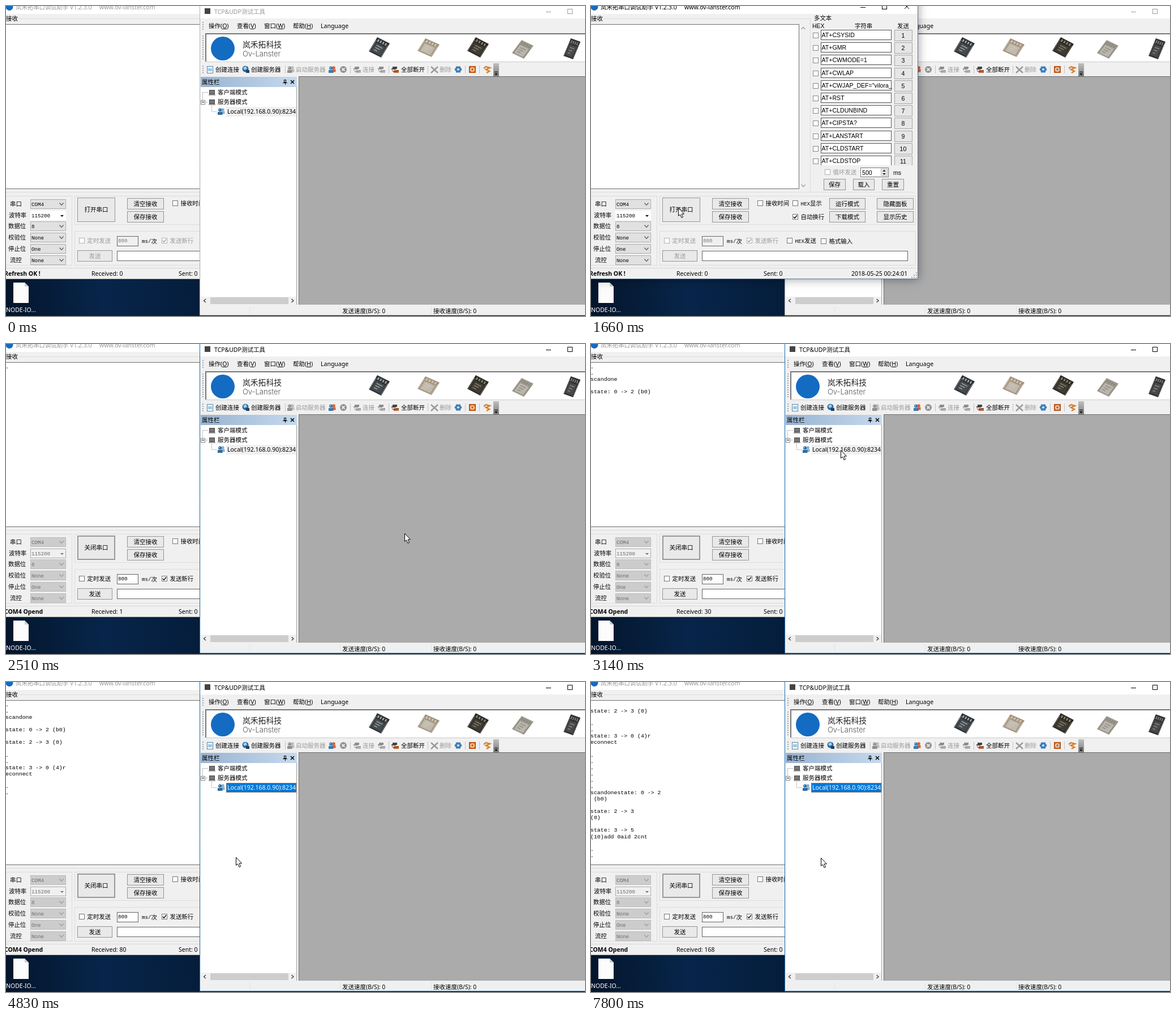
Animation, 1023 px wide and 547 px high, one loop 8000 ms. Source, as an HTML page with a canvas:

```html
<!DOCTYPE html>
<html lang="zh">
<head>
<meta charset="utf-8">
<style>
html, body { margin: 0; width: 100%; height: 100%; overflow: hidden; }
canvas { display: block; }
</style>
</head>
<body>
<canvas id="stage" width="1023" height="547"></canvas>
<script>
const g = document.getElementById('stage').getContext('2d');
const LOOP = 8000;
const CJK = '"Noto Sans CJK SC", "Noto Sans CJK JP", sans-serif';
const UI = '"Noto Sans", ' + CJK;
const ARIAL = '"Liberation Sans", ' + CJK;
const MONO = '"Liberation Mono", "Noto Sans CJK SC", monospace';
const GREY = '#9a9a9a';

// Serial log: [time, bytes received, ...new lines]
const log = [
  [2370, 1, '.'], [2970, 2, '.'],
  [3060, 30, 'scandone', '', 'state: 0 -> 2 (b0)', ''],
  [3220, 49, 'state: 2 -> 3 (0)', ''],
  [3440, 50, '.'], [3850, 51, '.'],
  [4220, 78, 'state: 3 -> 0 (4)r', 'econnect', ''],
  [4290, 79, '.'], [4760, 80, '.'], [5300, 81, '.'],
  [5770, 82, '.'], [6330, 83, '.'], [6790, 84, '.'],
  [7020, 112, 'scandonestate: 0 -> 2', ' (b0)', ''],
  [7090, 130, 'state: 2 -> 3', '(0)', ''],
  [7170, 166, 'state: 3 -> 5', '(10)add 0aid 2cnt', ''],
  [7250, 167, '.'], [7800, 168, '.']
];

// Pointer path: [time, x, y]
const path = [
  [70, 889, 537], [230, 790, 400], [390, 560, 260], [480, 430, 251],
  [620, 260, 300], [810, 164, 354], [880, 164, 354], [1050, 144, 355],
  [1430, 144, 355], [1470, 154, 357], [1890, 154, 357], [2370, 704, 335],
  [2680, 704, 335], [3080, 441, 188], [3380, 441, 188], [3430, 442, 184],
  [3640, 442, 184], [3670, 442, 183], [4220, 442, 183], [4290, 445, 190],
  [4800, 406, 310], [6390, 406, 310], [6400, 406, 311]
];

function text(s, x, y, color = '#000', size = 10.5, font = UI, weight = '') {
  g.font = `${weight} ${size}px ${font}`;
  g.fillStyle = color;
  g.fillText(s, x, y + size * 0.36);
}

function centred(s, x, y, color, size, font) {
  g.textAlign = 'center';
  text(s, x, y, color, size, font);
  g.textAlign = 'left';
}

function rect(x, y, w, h, fill, border) {
  if (fill) { g.fillStyle = fill; g.fillRect(x, y, w, h); }
  if (border) {
    g.strokeStyle = border;
    g.lineWidth = 1;
    g.strokeRect(x + 0.5, y + 0.5, w - 1, h - 1);
  }
}

function line(color, width, ...p) {
  g.strokeStyle = color;
  g.lineWidth = width;
  g.beginPath();
  for (let i = 0; i < p.length; i += 2) g.lineTo(p[i], p[i + 1]);
  g.stroke();
}

function poly(fill, ...p) {
  g.fillStyle = fill;
  g.beginPath();
  for (let i = 0; i < p.length; i += 2) g.lineTo(p[i], p[i + 1]);
  g.fill();
}

function dot(x, y, r, fill) {
  g.fillStyle = fill;
  g.beginPath();
  g.arc(x, y, r, 0, 7);
  g.fill();
}

function gradient(x0, y0, x1, y1, ...colors) {
  const f = g.createLinearGradient(x0, y0, x1, y1);
  colors.forEach((c, i) => f.addColorStop(i / (colors.length - 1), c));
  return f;
}

function button(s, x, y, w, h = 20, color = '#000') {
  rect(x, y, w, h, '#e9e9e9', '#959595');
  centred(s, x + w / 2, y + h / 2, color);
}

function check(s, x, y, on, color = '#000', tx = x + 14.5) {
  rect(x, y, 10, 10, '#fff', color === '#000' ? '#777' : '#b0b0b0');
  if (on) line(color, 1.4, x + 2, y + 5, x + 4, y + 7.4, x + 8, y + 2.5);
  const latin = s.startsWith('HEX') ? 'HEX' : '';
  if (latin) text(latin, tx, y + 5.5, color, 9.2, MONO);
  text(s.slice(latin.length), tx + latin.length * 5.5, y + 5.5, color, 10.4, CJK);
}

const chevron = (x, y, c) => line(c, 1.2, x - 3.5, y - 2, x, y + 1.8, x + 3.5, y - 2);

function desktop() {
  rect(0, 0, 1023, 547, gradient(0, 520, 343, 500, '#04152b', '#07254a', '#051d3b'));
  poly('#fcfcfc', 13, 488, 33, 488, 40, 495, 40, 524, 13, 524);
  poly('#c9d0d6', 33, 488, 40, 495, 33, 495);
  text('NODE-IO...', 0, 536, '#fff');
}

function titleButtons(x, y, c, close) {
  line(c, 1, x, y + 1.5, x + 9, y + 1.5);
  rect(x + 38, y - 4, 9, 9, null, c);
  if (close) {
    line(c, 1, x + 78, y - 4, x + 86, y + 4);
    line(c, 1, x + 86, y - 4, x + 78, y + 4);
  }
}

function combos(open) {
  const rows = [['串口', 'COM4', 7], ['波特率', '115200', 5], ['数据位', '8', 4],
    ['校验位', 'None', 4], ['停止位', 'One', 4], ['流控', 'None', 7]];
  rows.forEach(([label, value, x], i) => {
    const y = Math.round(341 + i * 19.7), edit = i === 1;
    text(label, x, y + 8, '#000', 10.4, CJK);
    if (edit) rect(43, y, 63, 17, open ? '#f0f0f0' : '#fff', open ? '#adadad' : '#fff');
    else rect(43, y, 63, 17, open ? '#cccccc' : '#e1e1e1', open ? '#bcbcbc' : '#adadad');
    const c = open ? '#6d6d6d' : '#000';
    text(value, 45, y + 8.5, c, 9.2, MONO);
    if (edit) poly(c, 96, y + 8, 102, y + 8, 99, y + 11);
    else chevron(98, y + 8.5, open ? '#999' : '#555');
  });
}

function multiText() {
  line('#dcdcdc', 1, 387.5, 22, 387.5, 328);
  text('多文本', 394, 21.5, '#000', 10.4, CJK);
  text('HEX', 391, 35, '#000', 10.5, ARIAL);
  text('字符串', 466, 35, '#000', 10.4, CJK);
  text('发送', 541, 35, '#000', 10.4, CJK);
  const cmds = ['CSYSID', 'GMR', 'CWMODE=1', 'CWLAP', 'CWJAP_DEF="vilora_', 'RST',
    'CLDUNBIND', 'CIPSTA?', 'LANSTART', 'CLDSTART', 'CLDSTOP'];
  g.save();
  g.beginPath();
  g.rect(388, 40, 186, 241);
  g.clip();
  cmds.forEach((cmd, i) => {
    const y = Math.round(42 + i * 22.2);
    rect(392, y + 5, 10, 10, '#fff', '#8a8a8a');
    rect(406, y, 125, 18, '#fff', '#555');
    text('AT+' + cmd, 407.5, y + 9, '#000', 10.6, ARIAL);
    rect(536, y, 32, 20, '#e6e6e6', '#a5a5a5');
    centred(i + 1, 551.5, y + 10.5, '#000', 10.6, ARIAL);
  });
  g.restore();
  check('循环发送', 413, 288, false, GREY);
  rect(476, 285, 50, 17, '#fff', '#777');
  text('500', 479, 294, '#000', 10.6, ARIAL);
  rect(512, 287, 12, 13, '#e8e8e8', '#bbb');
  poly('#222', 515, 292, 521, 292, 518, 289);
  poly('#222', 515, 295, 521, 295, 518, 298);
  text('ms', 534, 294, '#000', 10.6, ARIAL);
  button('保存', 411, 305, 39);
  button('载入', 463, 305, 38);
  button('重置', 514, 305, 39);
}

function serialWindow(t, active) {
  const open = t >= 1890, ink = open ? '#000' : GREY;
  g.save();
  if (active) { g.shadowColor = 'rgba(0,0,0,.4)'; g.shadowBlur = 16; }
  rect(-20, -20, 598, 502, '#f0f0f0');
  g.restore();
  rect(0, 0, 577, 14, '#fff');
  line(active ? '#5c7896' : '#aaa', 1, 577.5, 0, 577.5, 481.5, 0, 481.5);
  const title = active ? '#000' : GREY;
  dot(6, 1.5, 6.5, '#1769c2');
  text('岚禾拓串口调试助手', 17, 2, title, 10.4, CJK);
  text('V1.2.3.0', 113, 2, title);
  text('www.ov-lanster.com', 165, 2, title);
  titleButtons(476, 1, title, true);

  line('#dcdcdc', 1, 22, 22.5, 387, 22.5);
  line('#dcdcdc', 1, 0, 328.5, 573, 328.5);
  text('接收', 0, 22, '#000', 10.4, CJK);
  rect(-2, 32, 370, 291, '#fff', '#707070');
  chevron(375, 317, '#999');
  line('#999', 1.2, 371.5, 41, 375, 37.5, 378.5, 41);

  const seen = log.filter(e => t >= e[0]);
  const lines = seen.flatMap(e => e.slice(2));
  lines.slice(Math.max(0, lines.length - 25))
    .forEach((s, i) => text(s, -1, 39.3 + i * 11.08, '#000', 9.9, MONO));
  multiText();

  rect(-2, 335, 119, 123, null, '#dcdcdc');
  rect(121, 335, 453, 51, null, '#dcdcdc');
  rect(121, 397, 453, 61, null, '#dcdcdc');
  combos(open);

  button(open ? '关闭串口' : '打开串口', 126, 338, 67, 43);
  if (open) rect(127, 339, 65, 41, null, '#9c9c9c');
  else if (t >= 740 && t < 1660) line('#f0f0f0', 2, 127, 380, 127, 339, 192, 339);
  button('清空接收', 214, 339, 65);
  button('保存接收', 214, 362, 65);
  check('接收时间', 294, 343);
  check('HEX显示', 356, 343);
  check('自动换行', 356, 367, true);
  button('运行模式', 421, 339, 64);
  button('下载模式', 421, 362, 64);
  button('隐藏面板', 505, 339, 65);
  button('显示历史', 505, 362, 65);

  check('定时发送', 129, 409, false, ink);
  rect(196, 406, 38, 18, open ? '#fff' : '#f0f0f0', '#666');
  text('800', 198, 413.5, open ? '#000' : '#777', 9.2, MONO);
  text('ms/', 240, 415, '#000', 9.2, MONO);
  text('次', 256.5, 415, '#000', 10.4, CJK);
  check('发送新行', 275, 409, true, ink);
  check('HEX发送', 346, 409);
  check('格式输入', 406, 410);
  button('发送', 126, 431, 62, 20, ink);
  rect(196, 432, 364, 18, '#fff', '#666');

  line('#d8d8d8', 1, 0, 462.5, 577, 462.5);
  text(open ? 'COM4 Opend' : 'Refresh OK !', -3, 472, '#000', 10.5, UI, 'bold');
  text('Received: ' + (seen.length ? seen[seen.length - 1][1] : 0), 151, 472);
  text('Sent: 0', 305, 472);
  text('2018-05-25 00:24:0' + (open ? 2 : 1), 460, 472);
  for (let i = 0; i < 3; i++)
    for (let j = 0; j <= i; j++) rect(574 - j * 4, 470 + i * 4, 2, 2, '#aaa');
}

// Board in unit coordinates: u runs right, v runs down along the tilted sides
function chip(x, y, ux, uy, vx, vy, body, inner, mark) {
  g.save();
  g.transform(ux, uy, vx, vy, x, y);
  rect(0, 0, 1, 1, body);
  rect(0.14, 0.32, 0.72, 0.6, inner);
  for (let i = 0; i < 4; i++) rect(0.14 + i * 0.2, 0.08, 0.1, 0.16, mark);
  for (let i = 0; i < 8; i++) {
    rect(0.02, 0.2 + i * 0.1, 0.06, 0.05, mark);
    rect(0.92, 0.2 + i * 0.1, 0.06, 0.05, mark);
  }
  for (let i = 0; i < 3; i++) rect(0.26, 0.44 + i * 0.15, 0.46 - i * 0.1, 0.05, mark);
  g.restore();
}

function people(x, y, back, front) {
  dot(x + 3, y - 3, 2.8, back);
  rect(x, y - 0.5, 6.5, 5, back);
  dot(x - 2, y - 2.5, 3, front);
  rect(x - 6, y + 1, 8.5, 5, front);
  dot(x - 3, y - 3, 1, '#ffffffaa');
}

function plug(x, y, c, accent) {
  rect(x - 5, y - 5, 8, 4, c);
  rect(x - 7, y - 2, 8, 2, '#fff', c);
  rect(x - 3, y + 1, 9, 5, accent);
  line(c, 1, x - 6, y + 1, x - 4, y + 4, x + 6, y + 2);
}

function toolbar() {
  rect(355, 106, 11, 13, '#f4faff', '#5589ad');
  rect(357, 110, 7, 5, '#9cc9e4');
  text('创建连接', 370, 112);
  dot(423, 111, 5.5, '#286aa8');
  poly('#9ed2e7', 419, 109, 424, 106, 426, 111, 421, 113);
  rect(424, 113, 6, 5, '#263e59');
  text('创建服务器', 433, 112);
  people(503, 112, '#bdbdbd', '#8e8e8e');
  text('启动服务器', 512, 112, GREY);
  people(576, 112, '#e0602f', '#3a78ab');
  dot(596, 112, 6, '#929292');
  line('#fff', 1.5, 593.5, 109.5, 598.5, 114.5);
  line('#fff', 1.5, 598.5, 109.5, 593.5, 114.5);
  plug(621, 112, '#8e8e8e', '#b5b5b5');
  text('连接', 630, 112, GREY);
  plug(664, 112, '#8e8e8e', '#b5b5b5');
  plug(688, 112, '#444', '#bd6738');
  text('全部断开', 698, 112);
  line('#9a9a9a', 2.5, 751, 107, 763, 118);
  line('#9a9a9a', 2.5, 763, 107, 751, 118);
  text('删除', 766, 112, GREY);
  for (let i = 0; i < 6; i++)
    dot(799 + 4 * Math.cos(i * 1.047), 112 + 4 * Math.sin(i * 1.047), 2.4, '#3f80b8');
  rect(818, 106, 12, 12, '#d96d21', '#a54712');
  g.strokeStyle = '#fff';
  g.lineWidth = 1.2;
  g.beginPath();
  g.arc(824, 112, 3, 0, 7);
  g.stroke();
  line('#d28335', 2.5, 844, 110, 848, 107, 855, 109, 848, 112, 854, 115, 849, 118);
  for (const x of [493, 608, 676, 745, 811, 836]) line('#c4c4c4', 1, x + 0.5, 105, x + 0.5, 119);
  rect(861, 101, 10, 24, gradient(0, 101, 0, 125, '#c0c0c0', '#777'));
  line('#000', 1, 863, 116.5, 869, 116.5);
  poly('#000', 863, 119, 869, 119, 866, 122);
}

function tree(t) {
  rect(344, 125, 170, 18, gradient(344, 0, 514, 0, '#99b4d1', '#c6d9ed'));
  text('属性栏', 346, 134);
  rect(491, 130, 4, 5, null, '#000');
  line('#000', 1, 489, 135.5, 497, 135.5);
  line('#000', 1, 493.5, 135, 493.5, 139);
  line('#000', 1.5, 503, 131, 509, 137);
  line('#000', 1.5, 509, 131, 503, 137);
  rect(344, 143, 169, 384, '#fff');
  line('#a0a0a0', 1, 513.5, 143, 513.5, 527);
  g.setLineDash([1, 1]);
  line('#888', 1, 357, 152.5, 347.5, 152.5, 347.5, 169.5, 357, 169.5);
  line('#888', 1, 363.5, 176, 363.5, 186.5, 373, 186.5);
  g.setLineDash([]);
  rect(344, 166, 8, 8, '#fff', '#888');
  line('#000', 1, 346, 169.5, 350, 169.5);
  for (const y of [152, 169]) {
    rect(359, y - 4, 10, 8, '#777', '#444');
    rect(358, y + 4, 12, 2, '#aaa');
  }
  text('客户端模式', 374, 152);
  text('服务器模式', 374, 169);
  people(380, 186, '#86b2d2', '#2e6b9e');
  const picked = t >= 3370;
  rect(389, 178, 124, 17, picked ? '#0078d7' : '#f0f0f0', picked && '#7d776f');
  text('Local(192.168.0.90):8234', 391, 186, picked ? '#fff' : '#000');
  rect(344, 513, 169, 14, '#f0f0f0');
  rect(361, 514, 138, 12, '#cdcdcd');
  line('#444', 1.4, 353, 517, 349.5, 520, 353, 523);
  line('#444', 1.4, 504.5, 517, 508, 520, 504.5, 523);
}

function netWindow(t, active) {
  rect(342, 0, 681, 545, '#f0f0f0');
  rect(343, 0, 680, 22, '#fff');
  const title = active ? '#000' : GREY;
  rect(351, 4, 10, 10, '#444');
  text('TCP&UDP测试工具', 368, 10, title);
  titleButtons(954, 9, title);

  for (const [s, key, x] of [['操作', 'O', 358], ['查看', 'V', 408], ['窗口', 'W', 456], ['帮助', 'H', 507]]) {
    text(`${s}(${key})`, x, 35);
    const from = x + g.measureText(s + '(').width;
    line('#000', 1, from, 40.5, from + g.measureText(key).width, 40.5);
  }
  text('Language', 556, 35);
  for (const [from, to] of [[28, 43], [52, 96], [105, 120]])
    for (let y = from; y < to; y += 4) rect(347, y, 2, 2, '#a8a8a8');

  rect(352, 48, 671, 51, '#fff');
  line('#777', 2, 1023, 49, 353, 49, 353, 98);
  line('#ccc', 1, 353, 98.5, 1023, 98.5);
  dot(383, 75, 21, '#146bc2');
  text('岚禾拓科技', 418, 68, '#222', 13.8, CJK);
  text('Ov-Lanster', 418, 84, '#555', 13, '"Inter", sans-serif', '300');
  chip(656, 55, 22, 11, -15, 25, '#2a3138', '#454b50', '#a9a99e');
  chip(741, 57, 25, 11, -14, 22, '#a3937e', '#bfb9ae', '#d3c9b8');
  chip(830, 55, 23, 12, -15, 24, '#2b2925', '#3f3c36', '#8f856e');
  chip(911, 60, 21, 10, -17, 23, '#9d988d', '#b9b6ae', '#8c877c');
  chip(998, 57, 17, 6, -13, 31, '#303132', '#48494a', '#85857f');
  toolbar();
  tree(t);

  rect(517, 124, 506, 403, '#ababab');
  line('#6c6c6c', 1, 1023, 124.5, 517.5, 124.5, 517.5, 527);
  rect(343, 527, 680, 18, '#f0f0f0');
  for (const x of [430, 590, 751]) line('#e2e2e2', 1, x + 0.5, 530, x + 0.5, 543);
  text('发送速度(B/S): 0', 594, 538);
  text('接收速度(B/S): 0', 755, 538);
  line(active ? '#1b6fb5' : '#b5b5b5', 1, 342.5, 0, 342.5, 545.5, 1023, 545.5);
}

function pointer(t) {
  if (t < 70) return;
  t -= t % 70;
  let i = path.findIndex(k => k[0] > t);
  if (i < 0) i = path.length;
  const a = path[Math.max(0, i - 1)], b = path[i] || a;
  const f = b === a ? 0 : (t - a[0]) / (b[0] - a[0]);
  g.save();
  g.translate(Math.round(a[1] + (b[1] - a[1]) * f) + 0.5, Math.round(a[2] + (b[2] - a[2]) * f) - 0.5);
  g.beginPath();
  for (const [x, y] of [[0, 0], [0, 14], [3, 11.5], [5.5, 17], [8, 16], [5.5, 10.5], [10, 10.5]])
    g.lineTo(x, y);
  g.closePath();
  g.fillStyle = '#fff';
  g.fill();
  g.strokeStyle = '#000';
  g.lineWidth = 1;
  g.stroke();
  g.restore();
}

function frame(now) {
  const t = now % LOOP;
  const serialOnTop = t >= 1660 && t < 2510;
  desktop();
  if (serialOnTop) {
    netWindow(t, false);
    serialWindow(t, true);
  } else {
    serialWindow(t, false);
    netWindow(t, t >= 2510);
  }
  pointer(t);
  requestAnimationFrame(frame);
}
requestAnimationFrame(frame);
</script>
</body>
</html>
```
